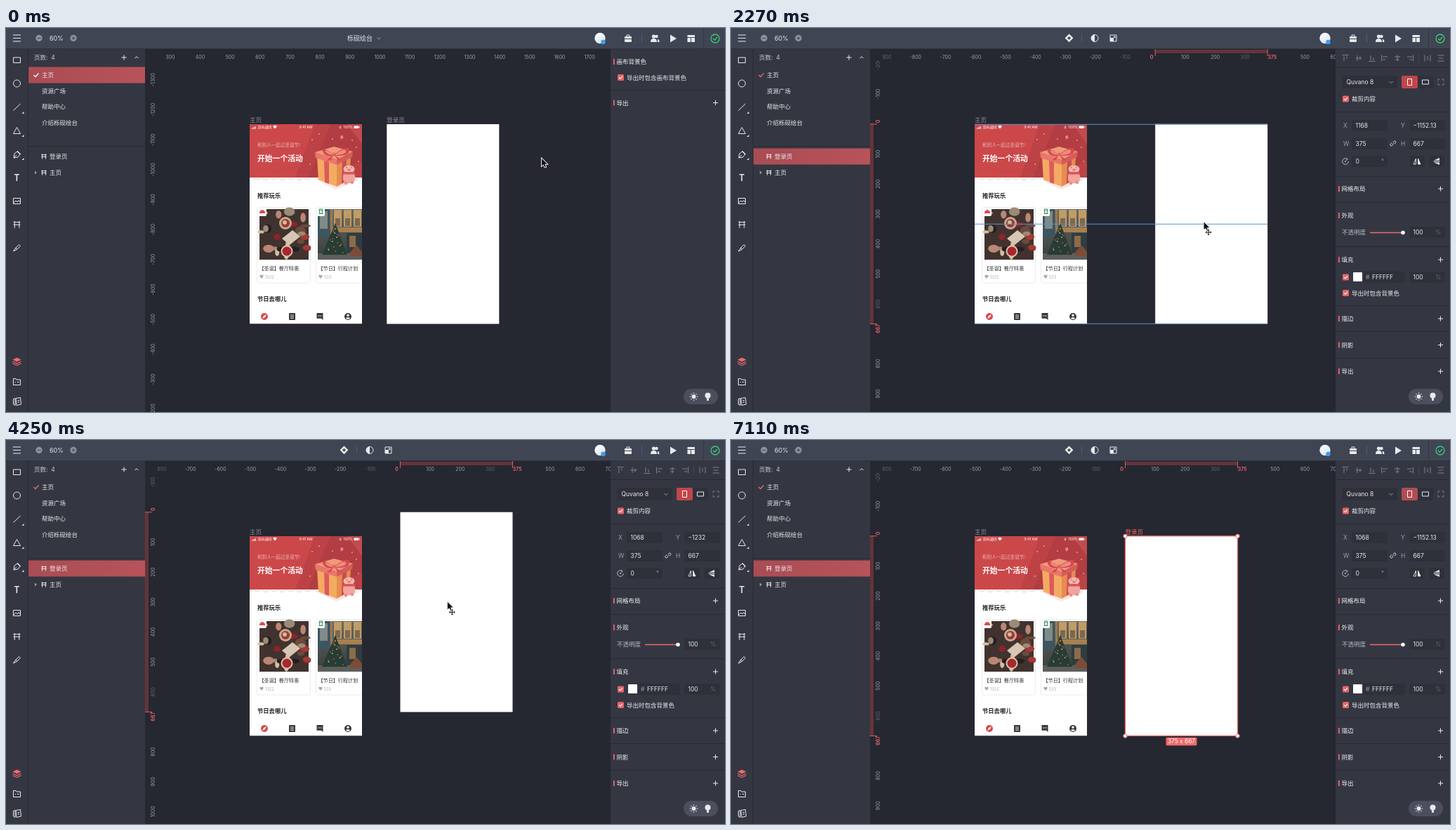
An HTML page with a canvas for the animation above (7.21 s loop, 1024 by 547 pixels).

```html
<!DOCTYPE html>
<html lang="zh-CN">
<head>
<meta charset="utf-8">
<title>设计工具</title>
<style>
html, body { margin: 0; width: 100%; height: 100%; overflow: hidden; background: #252731; }
canvas { display: block; width: 1024px; height: 547px; }
</style>
</head>
<body>
<canvas></canvas>
<script>
const canvas = document.querySelector('canvas'), g = canvas.getContext('2d');
const dpr = window.devicePixelRatio || 1;
canvas.width = 1024 * dpr;
canvas.height = 547 * dpr;
g.scale(dpr, dpr);

const LOOP = 7210, K = 160 / 375, W = 160, H = 284.6, SNAP_Y = -1152.13;
const RED = '#f0696b', LIGHT = '#e9eaed', GREY = '#9b9ea7', DIM = '#62656f', PANEL = '#343742', FIELD = '#2e303a', EDGE = '#282a34';

// The screen refreshes only at these moments.
const ticks = [0, 300, 475, 650, 1100, 1260, 1420, 1590, 1760, 1910, 2060, 2270, 2450, 2640, 2840, 3010, 3220,
  3430, 3630, 3840, 4050, 4250, 4460, 4670, 5000, 5210, 5800, 5970, 6130, 6290, 6460, 7110];
const HOVER = 475, SELECT = 1260, DRAG = 2060, DROP = 5800, LEAVE = 7110;
const pointerPath = [[0, 763, 186], [300, 722, 222], [475, 668, 258], [650, 640, 270], [1420, 629, 275], [1760, 629, 275],
  [1910, 610, 276], [2270, 673.5, 276.5], [2840, 629, 283.5], [3220, 629, 275], [3630, 629, 228], [4050, 629, 213],
  [4670, 628.5, 268], [5000, 628, 279], [5210, 628, 274], [5800, 640, 290], [6460, 915, 535]];
const framePath = [[0, 1023, -1151.82], [1910, 1023, -1151.82], [2060, 1105, SNAP_Y], [2270, 1168, SNAP_Y], [2840, 1090, -1138],
  [3220, 1069, -1160], [3630, 1068, -1235], [4050, 1068, -1265], [4670, 1069, -1162], [5000, 1070, -1140], [5210, 1068, SNAP_Y]];

function along(path, t) {
  const i = path.findIndex(p => p[0] > t);
  if (i < 0) return path[path.length - 1].slice(1);
  const a = path[i - 1], b = path[i], f = (t - a[0]) / (b[0] - a[0]);
  return [a[1] + (b[1] - a[1]) * f, a[2] + (b[2] - a[2]) * f];
}

function box(x, y, w, h, color, r = 0) {
  g.fillStyle = color;
  g.beginPath();
  g.roundRect(x, y, w, h, r);
  g.fill();
}
function fill(d, color, x = 0, y = 0) {
  g.save(); g.translate(x, y);
  g.fillStyle = color; g.fill(new Path2D(d));
  g.restore();
}
function line(d, color = LIGHT, x = 0, y = 0, width = 1) {
  g.save(); g.translate(x, y);
  g.strokeStyle = color; g.lineWidth = width; g.stroke(new Path2D(d));
  g.restore();
}
function dot(x, y, r, color, ry = r) {
  g.fillStyle = color;
  g.beginPath(); g.ellipse(x, y, r, ry, 0, 0, 7); g.fill();
}
function ring(x, y, r, color = LIGHT, width = 1) {
  g.strokeStyle = color; g.lineWidth = width;
  g.beginPath(); g.arc(x, y, r, 0, 7); g.stroke();
}
function text(s, x, y, color = LIGHT, size = 8.5, align = 'left', weight = 400) {
  g.font = `${weight} ${size}px Inter, "Noto Sans CJK SC", "Noto Sans CJK", sans-serif`;
  g.fillStyle = color; g.textAlign = align;
  g.fillText(s, x, y + size * .36);
}
function gradient(x0, y0, x1, y1, ...colors) {
  const fade = g.createLinearGradient(x0, y0, x1, y1);
  colors.forEach((c, i) => fade.addColorStop(i / (colors.length - 1), c));
  return fade;
}
const plus = (x, y) => line('M-3.5 0H3.5M0-3.5V3.5', LIGHT, x, y);
const frameIcon = (x, y, s = 1) => line(`M${-3 * s}${-4.5 * s}V${4.5 * s}M${3 * s}${-4.5 * s}V${4.5 * s}M${-4.5 * s}${-3 * s}H${4.5 * s}M${-4.5 * s}${3 * s}H${4.5 * s}`, LIGHT, x, y);
function clipped(x, y, w, h, draw) {
  g.save(); g.beginPath(); g.rect(x, y, w, h); g.clip();
  draw();
  g.restore();
}

function topBar(selected) {
  box(0, 0, 1024, 30, '#404554');
  box(0, 29, 1024, 1, '#30333e');
  line('M10 10H21M10 14.5H21M10 19H21');
  for (const x of [47, 96]) { dot(x, 14.5, 4.7, '#8d919c'); line('M-2.5 0H2.5', '#404554', x, 14.5); }
  line('M0-2.5V2.5', '#404554', 96, 14.5);
  text('60%', 62, 14.5, LIGHT, 8.8);
  if (selected) {
    line('M0-4.2L4.2 0 0 4.2-4.2 0Z', '#f4f4f6', 481.5, 14.3, 2.4);
    box(499, 9, 1, 11, '#565b69');
    ring(518, 14.5, 5);
    fill('M0-5A5 5 0 0 0 0 5Z', LIGHT, 518, 14.5);
    line('M-4.5-4.5H4.5V4.5H-4.5ZM-2 2L2-2M0-2.5H2.5V0', LIGHT, 544.5, 14.5);
    box(540, 14, 5, 5, LIGHT);
  } else {
    text('栎砚绘台', 486, 14.5, LIGHT, 9);
    line('M-2.5-1L0 1.5 2.5-1', GREY, 531, 14.5);
  }
  dot(846, 14.5, 7.7, gradient(840, 7, 850, 22, '#fff', '#d8e4f0'));
  dot(850.5, 20, 3.2, '#3d9cf0');
  box(881, 12, 10, 8, LIGHT, 1);
  line('M884 12V10H888V12M881 15.5H891', LIGHT);
  line('M881 15.5H891', '#404554');
  box(905, 8, 1, 13, '#565b69');
  dot(922.5, 12, 2.6, LIGHT); dot(926.5, 12, 2.2, LIGHT);
  fill('M918 20Q918 15 922.5 15T927 20ZM928 20V16Q930.5 16 930.5 20Z', LIGHT);
  fill('M946 9.5L955 15 946 20.5Z', LIGHT);
  box(970.5, 10, 10.5, 3, LIGHT); box(970.5, 14, 4.5, 6, LIGHT); box(976, 14, 5, 6, LIGHT);
  box(993, 0, 1, 30, '#343844');
  ring(1010, 15, 6, '#3ccb74', 1.3);
  line('M-3 0L-.7 2.2 3-2', '#3ccb74', 1010, 15, 1.3);
}

function toolStrip() {
  box(0, 30, 32, 517, PANEL);
  box(31, 30, 1, 517, EDGE);
  line('M10.5 42H20.5V49.5H10.5Z');
  ring(15.5, 79, 5);
  line('M10.5 117.5L20.5 108');
  line('M15.5 141.5L20.5 150.5H10.5Z');
  line('M11 185L12 179 16 176 20 180 17 184ZM11 185L15 181M16 175L21 180');
  text('T', 15.5, 213, LIGHT, 12.5, 'center', 600);
  line('M10.5 242.5H20.5V250.5H10.5ZM11 249L14 246 16 248 18 245.5 20 248');
  frameIcon(15.5, 280, 1.1);
  line('M10.5 318L14 313 18.5 308.5 20.5 310.5 15.5 315.5ZM14 313L15.5 315.5');
  for (const y of [121, 154, 187]) fill('M0-3V0H-3Z', LIGHT, 25.5, y + 1);
  fill('M15.5 469.5L21.5 472.5 15.5 475.5 9.5 472.5Z', RED);
  line('M9.5 475L15.5 478 21.5 475M9.5 477.7L15.5 480.7 21.5 477.7', RED, 0, 0, 1.2);
  line('M10.5 499.5H14L15 501H20.5V508.5H10.5ZM13 504.5H14M16 504.5H18.5');
  line('M10.5 528.5L13 527.5V537.5L10.5 536ZM14 527.5L20.5 526.5 21.5 536 15 537.5ZM16.5 530.5H19M16.5 533H19');
}

function layerPanel(hovered, selected) {
  box(32, 30, 166, 517, PANEL);
  const redRow = y => box(32, y, 166, 23, gradient(32, 0, 198, 0, '#a94c53', '#b8535a'));
  if (selected) redRow(171.5);
  else redRow(55.5);
  if (hovered) box(32, 171.5, 166, 23, '#3f4350');
  text('页数:  4', 40, 42, '#c9cbd0');
  plus(168, 42);
  line('M-2.5 1.2L0-1.3 2.5 1.2', LIGHT, 186, 42);
  line('M39.5 67L42 69.5 46.5 64.5', selected ? RED : '#fff', 0, 0, 1.3);
  ['主页', '资源广场', '帮助中心', '介绍栎砚绘台'].forEach((s, i) => text(s, 51, 67 + i * 22.7));
  box(32, 168, 166, 1, EDGE);
  frameIcon(54, 183, .8); text('登录页', 62, 183);
  frameIcon(54, 206, .8); text('主页', 62, 206);
  fill('M41 203.5L44 206 41 208.5Z', GREY);
}

function section(title, y, withPlus = true) {
  box(865, y - 4, 1.8, 8, RED);
  text(title, 869.5, y, '#f3f3f5', 8.5, 'left', 500);
  if (withPlus) plus(1010.5, y);
}
function checkbox(y, label) {
  box(871, y - 4.5, 9, 9, '#e4666a', 1.5);
  line('M-2.3 0L-.6 1.8 2.4-1.6', '#fff', 875.5, y, 1.1);
  text(label, 884, y);
}
function field(x, y, value, label, width = 51) {
  box(x, y - 8, width, 16, FIELD, 2);
  text(value, x + 5.5, y);
  if (label) text(label, x - 12, y, GREY);
}
const separator = y => box(861, y, 163, 1, EDGE);

function rightPanel(selected, dragging, X, Y) {
  box(861, 30, 163, 517, PANEL);
  if (!selected) {
    section('画布背景色', 48, false);
    checkbox(70.5, '导出时包含画布背景色');
    separator(88);
    section('导出', 106.5);
  } else {
    const bars = ['M-4.5-4.5H4.5M-2-3V4M2-3V1', 'M-4.5 0H4.5M-2-4V4M2-2.5V2.5', 'M-4.5 4.5H4.5M-2-4V3M2-1V3',
      'M-4.5-4.5V4.5M-3-2H4M-3 2H1', 'M0-4.5V4.5M-4-2H4M-2.5 2H2.5', 'M4.5-4.5V4.5M-4-2H3M-1 2H3', 'M-4-4.5V4.5M0-3V3M4-4.5V4.5', 'M-4.5-4H4.5M-3 0H3M-4.5 4H4.5'];
    [875, 894, 913, 931, 949, 967, 992, 1011].forEach((x, i) => line(bars[i], '#7d818c', x, 43));
    box(979, 37, 1, 12, '#454955');
    separator(56);
    box(870, 68, 79, 18, FIELD, 2);
    text('Quvano 8', 876.5, 77);
    line('M-2.5-1L0 1.5 2.5-1', GREY, 940, 77);
    box(955, 68, 45, 18, FIELD, 2);
    box(955, 68, 23, 18, dragging ? '#c1454a' : '#b04d54', 2);
    line('M963.5 72.5H969.5V81.5H963.5Z', '#fff');
    line('M984.5 74H993.5V80H984.5Z');
    line('M-4-1.5V-4H-1.5M1.5-4H4V-1.5M4 1.5V4H1.5M-1.5 4H-4V1.5', '#7d818c', 1011, 77);
    checkbox(101, '裁剪内容');
    separator(119);
    const num = v => String(v).replace('-', '−');
    field(884, 139, num(X), 'X'); field(966, 139, num(Y), 'Y');
    field(884, 165, '375', 'W'); field(966, 165, '667', 'H');
    line('M-.5 1.5L1.5-.5M-1.5-.5L-3.3 1.3A1.6 1.6 0 0 0-1 3.5L.5 2M.5-1.2L2-2.8A1.6 1.6 0 0 1 4-.4L2.4 1.2', LIGHT, 942.5, 164);
    field(884, 190, '0');
    text('°', 926, 190, GREY);
    line('M2.8-3.2A4.3 4.3 0 1 0 4.3 0M1-4.8L3.2-3 1.2-1.4', '#b5b8bf', 875, 190);
    dot(875, 190, 1.1, '#b5b8bf');
    box(966, 182, 22, 16, FIELD, 2); box(994, 182, 22, 16, FIELD, 2);
    line('M-1.5-4V4H-5ZM1.5-4V4H5Z', LIGHT, 977, 190, .9);
    fill('M1.5-4V4H5Z', LIGHT, 977, 190);
    line('M-4.5 0H4.5', LIGHT, 1005, 190);
    fill('M-4-1.5L4-5V-1.5ZM-4 1.5L4 5V1.5Z', LIGHT, 1005, 190);
    [211, 248, 311, 395, 432, 470].forEach(separator);
    section('网格布局', 229);
    section('外观', 267, false);
    text('不透明度', 870, 291, '#b9bbc2');
    line('M910 291.5H957', RED, 0, 0, 1.5);
    dot(957, 291.5, 2.8, '#fff');
    section('填充', 330);
    checkbox(355, '');
    box(886, 348, 13, 13, '#fff', 1);
    box(901, 346.5, 59, 17, FIELD, 2);
    text('#', 904, 355, GREY); text('FFFFFF', 913, 355);
    for (const y of [291, 355]) { field(966, y, '100'); text('%', 1003, y, DIM); }
    checkbox(377.5, '导出时包含背景色');
    section('描边', 414); section('阴影', 451.5); section('导出', 489);
  }
  box(965, 514, 49, 22, '#4b4f5d', 11);
  dot(979.5, 525, 3, LIGHT);
  for (let i = 0; i < 8; i++) dot(979.5 + 5 * Math.cos(i * Math.PI / 4), 525 + 5 * Math.sin(i * Math.PI / 4), .8, LIGHT);
  dot(999.5, 523.5, 4, LIGHT); box(998, 527, 3, 4, LIGHT, 1);
}

function giftBox() {
  fill('M440 215L470 230 501 217 492 206Z', '#fbe6e2');
  fill('M443 184L471 192V226L445 216Z', '#f5aa62');
  fill('M471 192L491 184 489 216 471 226Z', '#e68c52');
  fill('M453 187L460 189V222L454 220Z', '#dc5b5c');
  fill('M479 189L485 186 484 218 478 222Z', '#c94c50');
  fill('M440 177L467 169 494 176 471 188Z', '#f19a78');
  fill('M440 177L471 188V195L441 185Z', '#e9776b');
  fill('M471 188L494 176 493 184 471 195Z', '#d35e59');
  fill('M467 180Q447 167 451 176T467 182ZM467 180Q488 165 489 174T468 182ZM466 181L456 189 463 188ZM468 181L478 188 473 189Z', '#d8494f');
  fill('M465 179Q453 172 455 176T465 181ZM470 179Q483 170 484 175T470 181Z', '#ee8a80');
  dot(467.5, 180, 2.6, '#e46462');
  box(480, 205, 17, 16, '#f1a59d', 6);
  dot(488.5, 201, 8, '#f7b8ae', 5.5);
  box(480, 205, 17, 3.5, '#d8555a', 2);
  dot(488.5, 202, 2.5, '#e27773', 1.6); dot(485, 199, .7, '#8a3438'); dot(492, 199, .7, '#8a3438');
  dot(484, 221, 2.2, '#e98d86'); dot(493, 220, 2.2, '#e98d86');
}

function foodPhoto() {
  box(361, 258, 70, 72, '#40332f');
  let seed = 11;
  const rnd = () => (seed = seed * 16807 % 2147483647) / 2147483647;
  const tones = ['#d4bda5', '#a33a36', '#6b4a3c', '#241f20', '#bd8674', '#8c2429', '#9b8a76'];
  for (let i = 0; i < 28; i++) dot(363 + rnd() * 66, 260 + rnd() * 68, 3 + rnd() * 5, tones[i % 7], 2 + rnd() * 5);
  dot(398, 278, 9, '#cfa48c'); dot(398, 278, 6, '#8f4038'); dot(397, 277, 3, '#d9b59a');
  fill('M393 300L408 288 419 297 404 309Z', '#d8c6b4');
  dot(400, 318, 8.5, '#dfc0a7'); dot(400, 318, 6.5, '#a6282f');
}
function streetPhoto() {
  box(444, 258, 64, 72, gradient(0, 258, 0, 330, '#6d6a5f', '#4d5350', '#383d3d'));
  box(444, 258, 17, 40, '#3d5560'); box(447, 261, 11, 25, '#7e8b89');
  box(462, 258, 3, 60, '#9c7950');
  for (const x of [467, 481, 495]) { box(x, 259, 11, 24, '#c09c66'); box(x + 2, 271, 7, 11, '#7c6850'); }
  box(465, 284, 43, 7, '#a88051');
  box(485, 292, 23, 28, '#303d40'); box(489, 296, 9, 16, '#8d6c49');
  fill('M444 321H508V330H444Z', '#5c5f5b');
  fill('M469 278L486 323H450Z', '#263d35');
  for (let i = 0; i < 18; i++) {
    const y = 286 + i * 2;
    dot(469 + Math.sin(i * 5.3) * (y - 280) * .32, y, .9, i % 3 ? '#c45343' : '#d7af62');
  }
  fill('M490 320L499 309 508 320V325H490Z', '#7c4d36');
}

function homeScreen() {
  clipped(347, 137, W, H, () => {
    box(347, 137, W, H, '#fff');
    box(347, 137, W, 76, gradient(347, 137, 507, 213, '#cd4849', '#c8474a'));
    fill('M440 137H507V213H412Z', '#bd4246');
    fill('M462 137H507V190L440 213H430Z', '#b23d42');
    fill('M486 137H507V165Z', '#c44b4d');
    for (const [x, y] of [[436, 159], [446, 151], [465, 158], [479, 154], [493, 160], [499, 170], [433, 194], [502, 190]]) dot(x, y, .9, '#f0a49d');
    fill('M476 153L481 156 477 159Z', '#e98982');
    for (let i = 0; i < 7; i++) box(354 + i * 12, 214 + i % 2, 7, 2.5, '#fae7e5', 1);
    for (let i = 0; i < 4; i++) box(350 + i * 1.6, 142.5 - i * .8, 1, 1.2 + i * .8, '#fff');
    text('岚屿通讯', 358.5, 141.5, '#fff', 5.1);
    fill('M-3-1Q0-3.5 3-1L0 2.5Z', '#fff', 383, 141);
    text('9:41 AM', 427, 141.5, '#fff', 5, 'center');
    line('M-1-1L1 1 0 2V-2L1-1-1 1', '#fff', 476, 141.5, .5);
    text('100%', 480.5, 141.5, '#fff', 5.1);
    box(495.5, 139.5, 7, 3.5, '#fff', .8); box(503, 140.5, .8, 1.5, '#fff');
    text('和别人一起过圣诞节!', 358, 167, '#f0b5b3', 6.6, 'left', 300);
    text('开始一个活动', 358, 186, '#fff', 10.8, 'left', 600);
    giftBox();
    text('推荐玩乐', 358, 239, '#222', 8.3, 'left', 700);
    for (const x of [357.5, 441.5]) {
      g.strokeStyle = '#ececee'; g.lineWidth = 1;
      g.beginPath(); g.roundRect(x, 255.5, 76, 107.5, 3); g.stroke();
    }
    foodPhoto(); streetPhoto();
    box(359, 256, 12, 12, '#fff', 2); box(443, 256, 11, 12, '#fff', 2);
    fill('M361 262Q365 256 369 262V264H361Z', '#dd4a4b');
    line('M447 258H451V264H447ZM446 260H452M446 264.5H452', '#3f9a6b', -.5, 0, 1.1);
    text('【圣诞】餐厅特惠', 360.5, 342, '#333', 7.1);
    text('【节日】行程计划', 444.5, 342, '#333', 7.1);
    [[364, '1322'], [448, '533']].forEach(([x, n]) => {
      fill('M0 3L-2.6 0Q-3-2.4-1.2-2.4 0-2.2 0-1 0-2.2 1.2-2.4 3-2.4 2.6 0Z', '#aaa', x, 354);
      text(n, x + 5, 354.5, '#aaa', 5.6);
    });
    text('节日去哪儿', 358, 386.5, '#222', 8.3, 'left', 700);
    dot(368, 411, 5, '#d94a4c'); fill('M3-3L1 1-3 3-1-1Z', '#fff', 368, 411);
    box(403, 406, 9, 10, '#383838', 1); line('M405 409H410M405 411.2H410M405 413.4H410', '#fff', 0, 0, .8);
    fill('M442.5 406H451.5V416L449 413.8H442.5Z', '#383838');
    for (const x of [445, 447, 449]) dot(x, 410, .7, '#fff');
    dot(487, 411, 5, '#383838'); dot(487, 409.3, 1.7, '#fff'); dot(487, 413.5, 2.8, '#fff', 1.3);
  });
  text('主页', 347, 131, '#8a8d95');
}

function rulers(selected, fx, fy) {
  for (const vertical of [false, true]) {
    const length = vertical ? 667 : 375, corner = vertical ? 47 : 215;
    const start = vertical ? fy : fx, size = length * K;
    const origin = selected ? start : vertical ? 137 + 1151.82 * K : 542.3 - 1023 * K;
    const label = (s, p, color, weight) => {
      g.save();
      g.translate(vertical ? 209 : p, vertical ? p : 41);
      if (vertical) g.rotate(-Math.PI / 2);
      text(s, 0, 0, color, 7, 'center', weight);
      g.restore();
    };
    clipped(vertical ? 198 : corner, vertical ? corner : 30, 663, 517, () => {
      for (let u = -1400; u <= 1800; u += 100) {
        const p = origin + u * K;
        if (p < corner - 10 || p > 870) continue;
        if (selected && (u === 0 || Math.abs(u - length) < 50 && u > length)) continue;
        const near = selected && (u < length && u > length - 100 || !vertical && u === -100);
        label(u, p, near || p < corner + 15 ? DIM : GREY);
      }
    });
    if (!selected) continue;
    if (vertical) {
      box(198, start, 5, size, '#643439');
      line(`M198 ${start}H208M198 ${start + size}H208`, '#d75c60');
    } else {
      box(start, 31, size, 5, '#643439');
      line(`M${start} 30V40M${start + size} 30V40`, '#d75c60');
    }
    label('0', start - 5 + vertical, RED, 600);
    label(length, start + size + 6.7, RED, 600);
  }
}

function loginFrame(fx, fy, hovered, selected, dragging, snapped) {
  box(fx, fy, W, H, '#fff');
  if (dragging) {
    if (snapped) for (const y of [137, 279, 421]) line(`M347 ${y + .3}H${fx + W}`, '#5a93cf');
    return;
  }
  text('登录页', fx, fy - 6, hovered || selected ? RED : '#8a8d95');
  if (hovered || selected) line(`M${fx} ${fy}h${W}v${H}h${-W}Z`, RED, 0, 0, 1.3);
  if (!selected) return;
  for (const x of [fx, fx + W]) for (const y of [fy, fy + H]) { dot(x, y, 2.7, '#fff'); ring(x, y, 2.7, RED); }
  box(fx + 58, fy + 287, 44, 11.5, RED, 1.5);
  text('375 x 667', fx + 80, fy + 292.5, '#fff', 8.4, 'center');
}

function pointer(x, y, moving) {
  const arrow = 'M0 0V10.5L2.6 8.4 4.4 12.4 6 11.7 4.3 7.8H7.8Z';
  line(arrow, '#fff', x, y, 1.8);
  fill(arrow, '#111', x, y);
  if (!moving) return;
  const cross = 'M-3.5 0H3.5M0-3.5V3.5M-1.3-2.6L0-4 1.3-2.6M-1.3 2.6L0 4 1.3 2.6M-2.6-1.3L-4 0-2.6 1.3M2.6-1.3L4 0 2.6 1.3';
  line(cross, '#fff', x + 6.5, y + 14.5, 2.4);
  line(cross, '#111', x + 6.5, y + 14.5);
}

function draw(t) {
  const selected = t >= SELECT, hovered = t >= HOVER && !selected, dragging = t >= DRAG && t < DROP;
  let [X, Y] = along(framePath, t);
  const snapped = dragging && Math.abs(Y - SNAP_Y) < 4;
  if (snapped) Y = SNAP_Y;
  else if (dragging) Y = Math.round(Y);
  X = Math.round(X);
  const fx = 542.3 + (X - 1023) * K, fy = 137 + (Y + 1151.82) * K;
  box(0, 0, 1024, 547, '#252731');
  clipped(198, 30, 663, 517, () => {
    homeScreen();
    loginFrame(fx, fy, hovered, selected, dragging, snapped);
    rulers(selected, fx, fy);
  });
  topBar(selected);
  toolStrip();
  layerPanel(hovered, selected);
  rightPanel(selected, dragging, X, Y);
  if (t < LEAVE) pointer(...along(pointerPath, t), selected && t <= DROP);
}

let shown = -1;
function play() {
  const now = performance.now() % LOOP;
  const tick = ticks.findLast(t => t <= now);
  if (tick !== shown) draw(shown = tick);
  requestAnimationFrame(play);
}
play();
</script>
</body>
</html>
```
